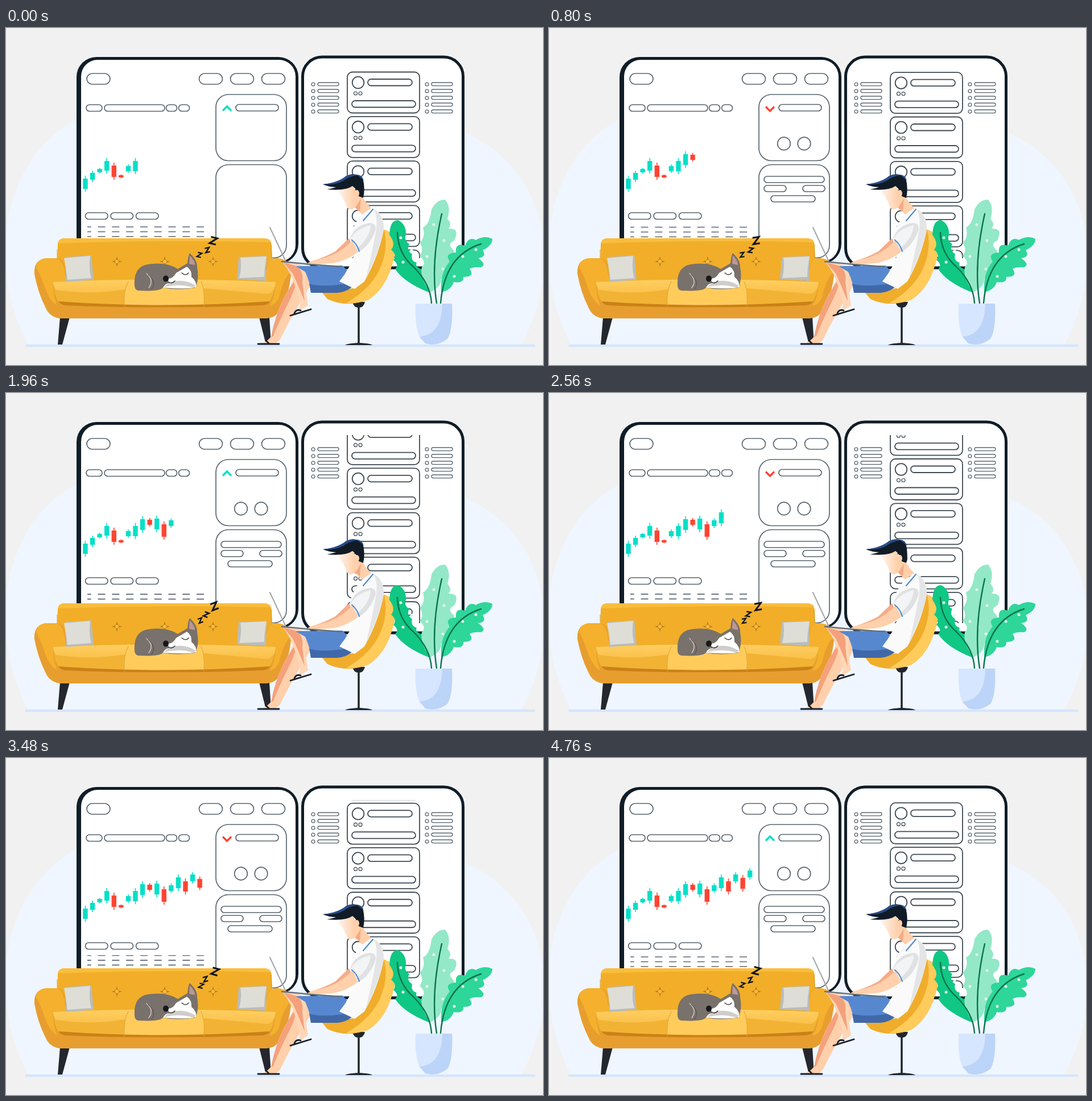
Recreate the animation shown at these times as an HTML page. Size 944 by 593 pixels, loop 4.8 s.

```html
<!DOCTYPE html>
<html lang="en">
<head>
<meta charset="utf-8">
<title>Working from the sofa</title>
<style>
html, body { margin: 0; width: 100%; height: 100%; overflow: hidden; background: #f1f1f1; }
svg { display: block; width: 944px; height: 593px; }
.ui { fill: none; stroke: #59656f; stroke-width: 1.7; }
#feed { fill: none; stroke: #3f4a53; stroke-width: 1.8; }
.line { fill: none; stroke-linecap: round; stroke-linejoin: round; }
</style>
</head>
<body>
<svg viewBox="0 0 944 593">
<defs>
  <clipPath id="feedClip"><path d="M595 74H732V405H595Z"/></clipPath>
  <clipPath id="rowClip"><path d="M143 347H360V372H143Z"/></clipPath>
  <linearGradient id="face"><stop offset=".05" stop-color="#fff1e8"/><stop offset=".5" stop-color="#ffd0ab"/></linearGradient>
  <linearGradient id="seat" x2="0" y2="1"><stop stop-color="#ffcf62"/><stop offset="1" stop-color="#fac04a"/></linearGradient>
</defs>

<path fill="#eff6ff" d="M39 558C-40 405 0 225 125 160L806 184C948 245 985 415 905 558Z"/>
<path stroke="#d5e5fb" stroke-width="4.5" stroke-linecap="round" d="M36 559H928"/>

<!-- screens -->
<rect x="124" y="51" width="390" height="364" rx="35" fill="#101d27"/>
<rect x="132" y="56" width="377" height="355" rx="29" fill="#fff"/>
<rect x="521.5" y="51" width="282" height="371" rx="34" fill="#fff" stroke="#101d27" stroke-width="5"/>
<g id="screen" class="ui"></g>
<g id="details" class="ui"></g>
<g clip-path="url(#feedClip)"><g id="feed"></g></g>
<g clip-path="url(#rowClip)"><path id="rows" class="ui" stroke-dasharray="13 11.8"/></g>
<g id="candles"></g>
<path id="chevron" fill="none" stroke-width="3.4"/>

<!-- sofa -->
<g>
  <path fill="#25272e" d="M95 509H112L99 557H91ZM445 509H463L466 557H457Z"/>
  <path fill="#f2ae28" d="M89 460L91 380Q92 370 103 370H454Q466 371 467 382L470 460Z"/>
  <path fill="#fabd3d" d="M91 379Q93 370 103 370H454Q465 371 466 377Q290 372 91 379Z"/>
  <path class="line" stroke="#d99720" d="M90 390V405M466 382L467 405"/>
  <path fill="#e79e2f" d="M50 433Q48 407 72 405H90Q104 407 103 425L108 445H450L459 416Q462 405 476 405Q501 406 501 435Q497 470 485 490Q477 510 458 511H95Q76 509 69 491Q56 465 50 433Z"/>
  <path fill="#f5b12d" d="M53 421Q55 405 73 405H88Q101 408 103 431L108 447H83Q82 470 90 488Q75 480 66 450Q58 428 53 421ZM459 422Q460 405 476 405Q498 407 500 429Q486 444 480 474Q475 486 463 489Q475 470 473 448H451Z"/>
  <path fill="#f2b334" d="M83 446Q85 475 94 483Q270 500 462 483Q472 470 474 446Z"/>
  <path fill="url(#seat)" d="M83 447Q280 438 474 447Q472 465 460 468L349 458Q280 455 208 460Q150 470 88 461Q83 454 83 447Z"/>
  <path fill="#ffcc5b" d="M214 446H344Q350 455 348 488Q280 493 208 490Q206 462 214 446Z"/>
  <path fill="#ca8117" d="M92 481Q270 494 464 481Q462 487 450 488Q270 495 103 488Q95 486 92 481Z"/>
  <path class="line" stroke="#dfa132" d="M215 446Q206 462 208 490M343 446Q350 460 348 490"/>
  <g id="buttons"></g>
  <path fill="#b9bdbc" d="M104 403L150 400L154 443L106 447ZM409 403L458 401L457 445L406 442Z"/>
  <path fill="#deded7" d="M102 405L148 401Q145 425 150 440L108 443Q106 423 102 405ZM412 404L458 402Q454 423 454 438L410 440Q415 422 412 404Z"/>
</g>

<!-- dog -->
<g>
  <path fill="#79716b" d="M226 453Q224 420 249 416Q281 411 302 424L319 414Q320 401 323 396Q337 409 336 421Q340 441 333 457Q300 462 276 457Q270 464 232 462Q226 460 226 453Z"/>
  <path fill="#bf9791" d="M323 400Q333 411 332 417L322 415Z"/>
  <path fill="#fff" d="M284 441Q294 441 299 431L318 420Q327 426 326 438Q336 446 334 456Q320 460 276 457Q280 449 287 449Z"/>
  <path fill="#77706a" d="M286 449Q310 439 333 453L331 457Q304 449 278 456Z" opacity=".35"/>
  <ellipse cx="281" cy="441" rx="5" ry="5.5" fill="#17181c"/>
  <path class="line" stroke="#3f3a38" stroke-width="1.5" d="M309 431Q316 437 321 431M286 447Q291 451 297 445"/>
  <path class="line" stroke="#cfc8c2" stroke-width="1.5" d="M247 432Q261 444 251 457"/>
  <path class="line" stroke="#554e4a" d="M250 434Q266 446 256 460"/>
</g>
<g id="zzz" class="line" stroke="#10151d" style="stroke-linecap:butt;stroke-linejoin:miter"></g>

<!-- chair -->
<path stroke="#20262d" stroke-width="3.5" d="M620 485V556"/>
<path fill="#20262d" d="M609 482H631Q629 492 620 492Q611 492 609 482ZM596 558Q600 555 620 554Q641 555 644 558Z"/>
<path fill="#f0ad2b" d="M662 354Q690 360 683 400Q671 457 637 478Q600 493 565 477L556 466L610 458Q650 410 662 354Z"/>
<path fill="#ffcb5b" d="M665 355Q690 363 683 400Q671 457 637 478Q619 485 598 484Q645 457 660 417Q672 385 665 355Z"/>

<!-- man -->
<g>
  <path fill="#ffd0ab" d="M533 436Q537 452 529 463Q500 510 482 548L474 556L449 556Q463 549 467 541Q474 497 500 455L512 425Z"/>
  <path fill="#f5a17c" d="M502 452L513 439Q506 465 498 480Q478 520 470 542L466 544Q474 497 502 452Z"/>
  <path fill="#ffd7b7" d="M486 412Q516 412 529 424Q523 445 528 468L531 488L511 501Q520 489 515 477Q505 434 486 412Z"/>
  <path fill="#f4a17b" d="M487 412L508 418Q524 425 521 447L525 481Q512 449 504 432Z"/>
  <path class="line" stroke="#1c2028" stroke-width="2.8" d="M443 556H480M457 550L463 556M500 506L536 495M507 502Q510 494 518 497"/>
  <path fill="#5788cf" d="M509 419L592 418L616 446Q607 464 580 466L536 465Q535 449 526 429Z"/>
  <path fill="#4068a9" d="M533 450Q560 458 614 447Q604 465 580 466H536Z"/>
  <path fill="#f6ac88" d="M603 370L579 393Q561 403 544 408L562 413L613 386Z"/>
  <path fill="#fafafb" d="M627 327L646 317Q665 328 664 355Q655 402 630 446L613 459L586 446Q607 420 613 395L604 372Q608 348 627 327Z"/>
  <path fill="#e4e5e6" d="M647 319Q665 329 664 355Q656 394 633 440Q644 392 649 365Q655 338 647 319Z"/>
  <path fill="#dfe1e2" d="M605 371Q612 349 634 344Q650 340 650 354Q641 382 620 394Z"/>
  <path fill="#f3f4f5" d="M606 371Q614 354 641 347Q640 369 616 389Z"/>
  <path fill="#ffd0ab" d="M609 374L619 394Q597 411 573 414L526 417Q536 408 554 406Q585 399 609 374Z"/>
  <path class="line" stroke="#508bd0" stroke-width="2.2" d="M608 373Q617 380 621 393M645 319L628 339"/>
  <path fill="url(#face)" d="M583 282Q596 278 607 275L620 295L627 298Q634 309 642 317L626 328L613 316Q605 323 599 315Q596 303 586 291Z"/>
  <path fill="#f5aa84" d="M614 316L624 300L622 323Z"/>
  <path fill="#111b26" d="M557 275Q588 272 597 261Q613 252 627 264Q632 282 628 299L620 296Q618 285 609 278Q597 287 564 284Q575 282 580 280Q568 280 557 275Z"/>
  <path fill="#284e8a" d="M557 275Q583 272 597 261Q607 255 618 259Q603 261 593 269Q578 277 557 275ZM615 258Q626 257 629 269Q624 263 615 258Z"/>
  <ellipse cx="617" cy="291" rx="4" ry="6" fill="#ffd0ab"/>
</g>
<path class="line" stroke="#a1a5a7" stroke-width="2" d="M464 351L492 411"/>
<path class="line" stroke="#687078" stroke-width="2.4" d="M485 411L536 416L589 420"/>

<!-- plant -->
<g>
  <path fill="#10c784" d="M743 465Q700 448 684 424Q692 417 681 408Q688 399 677 390Q686 380 674 364Q675 338 689 338Q704 345 703 364Q699 374 709 380Q703 390 714 398Q711 410 722 413Q718 420 732 425Q742 445 743 465Z"/>
  <path fill="#93e8c8" d="M746 465Q727 440 731 421Q740 412 727 401Q736 390 727 378Q738 368 733 351Q745 345 748 319Q758 301 772 302Q783 315 776 336Q785 345 778 353Q799 352 788 374Q774 380 787 391Q790 410 775 417Q783 434 765 441Q766 455 746 465Z"/>
  <path fill="#2ed69a" d="M765 465Q763 430 780 411Q770 396 791 395Q789 377 807 383Q813 366 826 373Q842 364 855 371Q855 383 838 391Q846 403 830 405Q846 416 835 421Q822 420 815 424Q825 438 804 438Q805 450 787 447Q783 461 765 465Z"/>
  <path class="line" stroke="#08734c" stroke-width="2.4" d="M748 484Q746 450 717 421Q689 397 688 360M757 484Q746 415 766 327M764 484Q771 400 835 380"/>
  <g id="dots" fill="#dff8ed"></g>
  <path fill="#d7e6ff" d="M720 485H784Q786 530 776 547Q752 567 729 547Q718 530 720 485Z"/>
  <path fill="#bcd4f7" d="M767 485H784Q786 530 776 547Q757 561 737 555L727 543Q766 540 767 485Z"/>
</g>
</svg>

<script>
const LOOP = 4800, PITCH = 78.3, UP = '#05dfc8', DOWN = '#ff4433';
const $ = id => document.getElementById(id);
const clamp = v => Math.max(0, Math.min(1, v));
const smooth = v => (v = clamp(v)) * v * (3 - 2 * v);
const box = (x, y, w, h, r = h / 2) => `<rect x="${x}" y="${y}" width="${w}" height="${h}" rx="${r}"/>`;
const ring = (x, y, r) => `<circle cx="${x}" cy="${y}" r="${r}"/>`;
const repeat = (n, fn) => Array.from({ length: n }, (_, i) => fn(i)).join('');

// Eased value through [time, value] keys
function track(keys, t) {
  const i = keys.findIndex(k => k[0] > t);
  if (i < 0) return keys[keys.length - 1][1];
  const [t0, a] = keys[i - 1], [t1, b] = keys[i];
  return a + (b - a) * smooth((t - t0) / (t1 - t0));
}

$('screen').innerHTML =
  [142, 339.5, 394.5, 449.5].map(x => box(x, 80, 41, 19)).join('') +
  [[141, 28], [173, 106], [281.5, 19], [303.5, 19]].map(([x, w]) => box(x, 135, w, 11.5)).join('') +
  box(369, 117, 124, 116.5, 22) + box(369, 240.5, 124, 164, 22) + box(404, 134.5, 75, 11.5) +
  [139.5, 184, 228.5].map(x => box(x, 325, 39.5, 11.5)).join('') +
  '<g stroke-width="1.3">' + [540, 740].map(x => repeat(5, i =>
    ring(x, 99 + 12 * i, 2.9) + box(x + 8, 96 + 12 * i, 37, 5.6))).join('') + '</g>';

$('details').innerHTML = ring(413, 203.5, 11.3) + ring(448.5, 203.5, 11.3) +
  box(378, 261, 106, 11) + box(378, 277, 39, 11) + box(446, 277, 39, 11) + box(390, 295, 78, 11);

$('feed').innerHTML = repeat(7, i => `<g transform="translate(0 ${77.5 + PITCH * i})">` +
  box(600, 0, 127, 72, 9) + ring(619, 18.5, 10.3) + box(636, 12.5, 78, 11.5) +
  box(608, 50.5, 112, 11.5) + '<g stroke-width="1.2">' + ring(614.5, 37.5, 3) + ring(623, 37.5, 3) + '</g></g>');

$('rows').setAttribute('d', repeat(6, i => `M136.7 ${341.5 + 8.5 * i}H365`));

$('buttons').innerHTML = [195, 279, 364].map(x =>
  `<path fill="#b97a15" d="M${x} 402l2 7 7 2-7 2-2 7-2-7-7-2 7-2Z"/><circle cx="${x}" cy="411" r="3.6" fill="#f4bd45" stroke="#c78a20"/>`).join('');

$('dots').innerHTML = [[694, 369], [713, 391], [698, 412], [752, 346], [770, 374], [740, 402], [768, 424], [803, 402], [826, 390], [788, 437]]
  .map(([x, y]) => ring(x, y, 2.5)).join('');

// Body top and height; a negative height marks a falling candle
const prices = [[265, 18], [255, 12], [248, 6], [234, 17], [242, -20], [259, -4], [243, 9], [234, 18], [222, 19],
  [223, -9], [221, 19], [231, -22], [224, 10], [210, 19], [217, -18], [205, 12], [211, -19], [198, 12]];
$('candles').innerHTML = prices.map(([y, size], i) => {
  const h = Math.abs(size), wick = Math.min(5.2, h / 3), x = 139.5 + 12.57 * i;
  return `<g fill="${size > 0 ? UP : DOWN}">` + box(x - 4.2, y, 8.4, h, 0) + box(x - .8, y - wick, 1.6, h + 2 * wick, 0) + '</g>';
}).join('');

// x, y, half size, stroke, sideways sway, turn
const letters = [[341.4, 400, 3.7, 2.2, -2, 1], [352.4, 390, 3.9, 2.4, 2.3, -1], [366, 375, 5.7, 3, -1.9, 1]];
$('zzz').innerHTML = letters.map(([, , s, w]) => `<path stroke-width="${w}" d="M${-s} ${-s}H${s}L${-s} ${s}H${s}"/>`).join('');

const scrollKeys = [[0, 0], [900, .7], [960, .6], [2250, -116.8], [2800, -119], [3250, -154], [3800, -155.2]];
const rowKeys = [[0, 0], [800, .5], [1520, 4.2], [2560, 3.9], [3160, 5.6], [3800, 6], [4480, 8.5]];
const flips = [600, 1000, 1350, 1750, 2500, 2960, 3320, 4040];

function draw(t) {
  const count = 8.2 + t / 400;
  prices.forEach(([y, size], i) => {
    const s = clamp((count - i - .7) * 4), mid = y + Math.abs(size) / 2;
    $('candles').children[i].setAttribute('transform', `translate(0 ${mid * (1 - s)}) scale(1 ${s})`);
  });

  const falling = flips.filter(f => f <= t).length % 2;
  $('chevron').setAttribute('d', falling ? 'M381 138.5L388.5 146L396 138.5' : 'M381 145.5L388.5 138L396 145.5');
  $('chevron').setAttribute('stroke', falling ? DOWN : UP);

  [...$('details').children].forEach((el, i) => el.setAttribute('opacity', smooth((t - 80 - 50 * i) / 280)));
  $('feed').setAttribute('transform', `translate(0 ${track(scrollKeys, t)})`);
  $('feed').lastChild.setAttribute('opacity', smooth((t - 3700) / 700));
  $('rows').setAttribute('transform', `translate(0 ${track(rowKeys, t)})`);

  const wave = shift => Math.cos(2 * Math.PI * (t - shift) / LOOP);
  letters.forEach(([x, y, , , sway, turn], i) => {
    const dx = sway * wave(600), dy = -turn * wave(600);
    $('zzz').children[i].setAttribute('transform', `translate(${x + dx} ${y + dy}) rotate(${22 * turn * wave(4100)})`);
  });
}

const start = performance.now();
(function frame() {
  draw((performance.now() - start) % LOOP);
  requestAnimationFrame(frame);
})();
</script>
</body>
</html>
```
